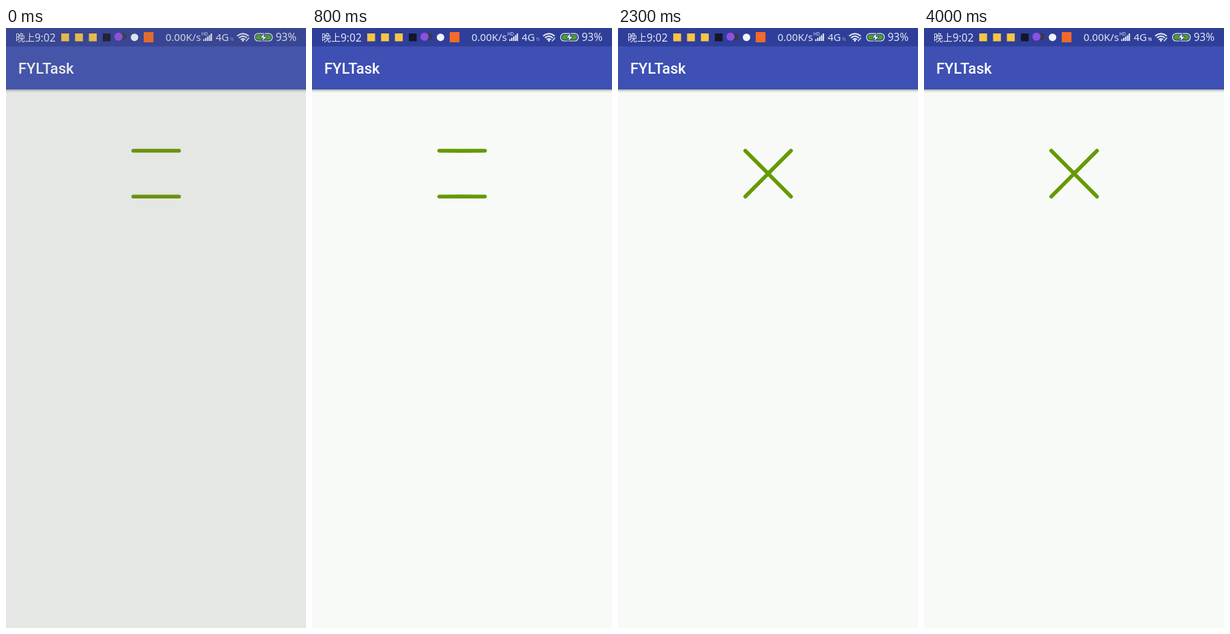
Animation, 440 px wide and 880 px high, one loop 4.3 s. Source, as an HTML page:

```html
<!DOCTYPE html>
<html lang="zh">
<head>
<meta charset="utf-8">
<title>Morphing lines</title>
<style>
  html, body { margin: 0; width: 100%; height: 100%; overflow: hidden; background: #f8faf7; }
  svg { display: block; width: 440px; height: 880px; }
  .status { font: 15px "Noto Sans", "Noto Sans CJK SC", "Noto Sans CJK", sans-serif; fill: #e2e5f2; }
  .title { font: 500 22px Roboto, sans-serif; fill: #fff; }
</style>
</head>
<body>
<svg viewBox="0 0 440 880">
  <defs>
    <linearGradient id="shade" x2="0" y2="1">
      <stop offset="0" stop-opacity=".36"/>
      <stop offset=".4" stop-opacity=".12"/>
      <stop offset="1" stop-opacity="0"/>
    </linearGradient>
  </defs>
  <rect width="440" height="880" fill="#f8faf7"/>
  <rect y="90" width="440" height="5" fill="url(#shade)"/>
  <rect width="440" height="90" fill="#3e50b3"/>
  <rect width="440" height="27" fill="#2f3f99"/>
  <text class="title" x="18" y="67">FYLTask</text>

  <g class="status">
    <text x="14" y="19" font-size="14" style="font-size:14px">晚上</text>
    <text x="42" y="19.5" style="font-size:15.5px">9:02</text>
    <text x="234" y="19">0.00K/s</text>
    <text x="286.5" y="11" style="font-size:6.5px">HD</text>
    <text x="307.5" y="19">4G</text>
    <text x="395.5" y="19" style="font-size:15.5px">93%</text>
  </g>

  <!-- notification icons -->
  <g fill="#f7c545">
    <rect x="81" y="8" width="11.5" height="11.5"/>
    <rect x="101.3" y="8" width="11.5" height="11.5"/>
    <rect x="121.6" y="8" width="11.5" height="11.5"/>
  </g>
  <rect x="142" y="8" width="11.5" height="11.5" rx="1" fill="#15162a"/>
  <circle cx="172" cy="12.5" r="5" fill="#38394f"/>
  <circle cx="165" cy="12.8" r="6" fill="#8e4fe0"/>
  <circle cx="188.5" cy="13.7" r="5.5" fill="#f2f4fa"/>
  <rect x="202" y="6" width="14.3" height="15" fill="#f56a28"/>

  <!-- signal, data arrows, wifi -->
  <path d="M290.2 19V16.5M293 19V14.5M295.8 19V12.5M298.6 19V10.5M301.2 19V8" stroke="#eef0f8" stroke-width="1.9"/>
  <path id="arrows" d="M330.2 18.5V14M329 15.3L330.2 14M332.6 14V18.5M333.8 17.2L332.6 18.5" fill="none" stroke="#f0f2fa"/>
  <g fill="none" stroke="#eef0f8" stroke-width="1.8">
    <path d="M339 11.8Q347.5 4.8 356 11.8M341.7 14.5Q347.5 9.6 353.3 14.5M344.3 17Q347.5 14.4 350.7 17"/>
    <path d="M352 19.3L356.5 14.3" stroke-width="1.3"/>
  </g>
  <circle cx="347.5" cy="18.4" r="1.5" fill="#eef0f8"/>

  <!-- battery -->
  <rect x="364.6" y="8.2" width="26" height="10.8" rx="5" fill="#2f3f99" stroke="#eef0f8" stroke-width="1.2"/>
  <rect x="366.6" y="10.1" width="22" height="7" rx="3" fill="#4aa514"/>
  <path d="M379.5 6.8L372.8 14.4H376.8L375.3 20.2L382.6 12.5H378.4Z" fill="#fff" stroke="#2f3f99" stroke-width=".9"/>

  <path id="lines" fill="none" stroke="#690" stroke-width="5.6" stroke-linecap="round"/>
  <rect id="dim" width="440" height="880" fill="#757575"/>
</svg>
<script>
  const LOOP = 4300, START = 768, DURATION = 1000;
  const LEFT = 186.7, MID = 220.2, RIGHT = 253.7, TOP = 180, BOTTOM = 247.2;
  const REFRESH = [0, 600, 800, 1100, 1300, 1400, 1600, 1800, 1900];
  const [lines, dim, arrows] = ['lines', 'dim', 'arrows'].map(id => document.getElementById(id));

  const ease = x => 0.5 - Math.cos(Math.PI * x) / 2;
  const bend = (y, dy) => `M${LEFT} ${y}L${MID} ${y + dy}L${RIGHT} ${y}`;

  function draw(now) {
    const t = now % LOOP;
    const shown = REFRESH.filter(r => r <= t).pop();
    const progress = Math.min(1, Math.max(0, (shown - START) / DURATION));
    const depth = ease(progress) * (BOTTOM - TOP) / 2;
    lines.setAttribute('d', bend(TOP, depth) + bend(BOTTOM, -depth));
    dim.setAttribute('opacity', t < 400 ? 0.142 : t < 500 ? 0.15 : 0);
    arrows.setAttribute('opacity', t >= 4000 ? 1 : 0.45);
  }

  let origin;
  function tick(now) {
    origin ??= now;
    draw(now - origin);
    requestAnimationFrame(tick);
  }
  draw(0);
  requestAnimationFrame(tick);
</script>
</body>
</html>
```
